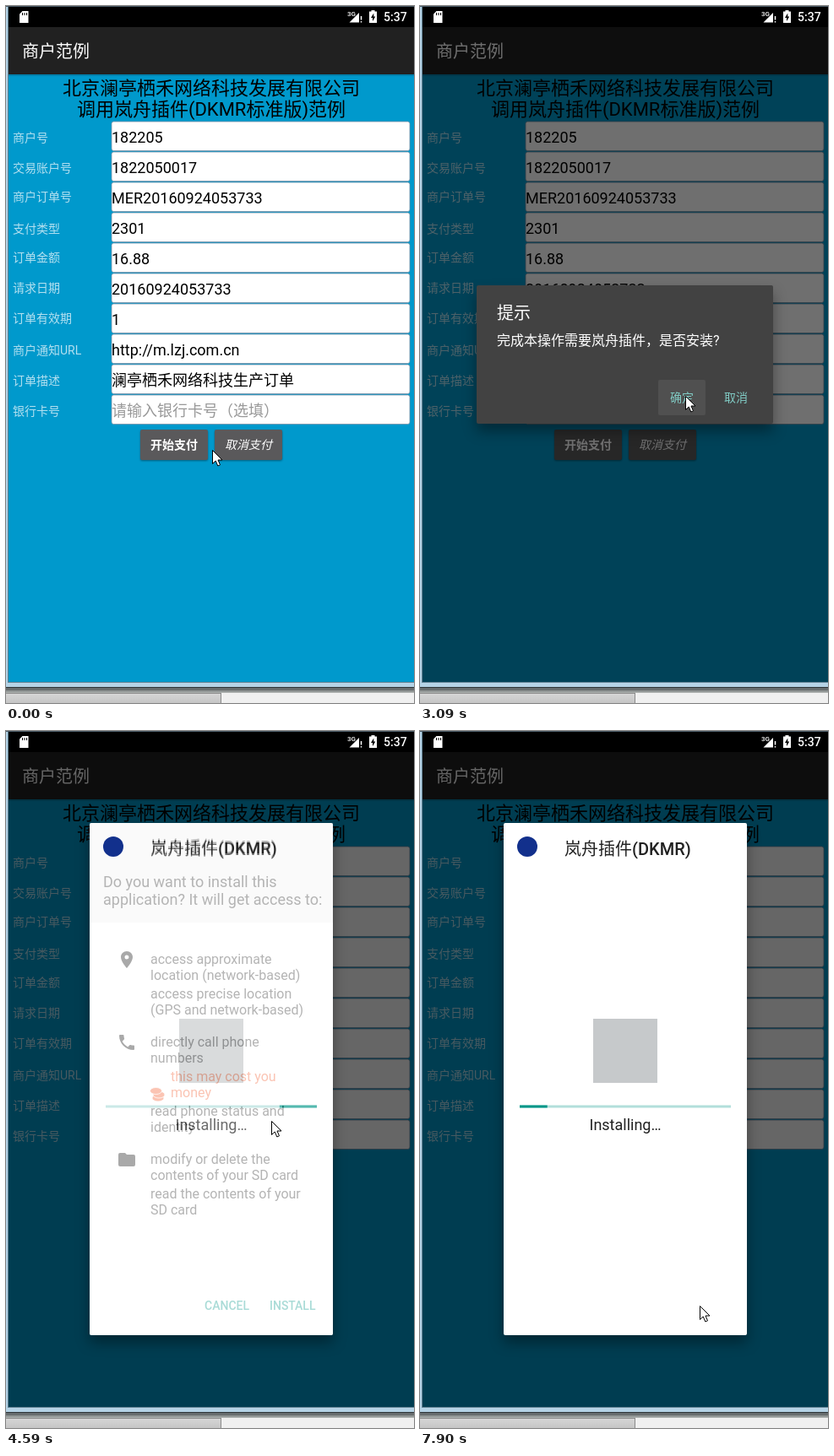
An HTML page for the animation above (8000 ms loop, 483 by 826 pixels).

```html
<!DOCTYPE html>
<html lang="zh">
<head>
<meta charset="utf-8">
<title>商户范例</title>
<style>
html, body { margin: 0; width: 100%; height: 100%; overflow: hidden; background: #f0f0f0; }
svg { display: block; width: 483px; height: 826px; font-family: Roboto, "Noto Sans CJK SC", "Noto Sans CJK", sans-serif; }
.mid { text-anchor: middle; }
.med { font-weight: 500; }
.bold { font-weight: 700; }
.lift { filter: drop-shadow(0 9px 8px rgba(0,0,0,.36)); }
.low { filter: drop-shadow(0 1px 1px rgba(0,0,0,.4)); }
</style>
</head>
<body>
<svg viewBox="0 0 483 826">
  <defs>
    <linearGradient id="edge" x2="0" y2="1">
      <stop offset="0" stop-color="#4c5254"/><stop offset="1" stop-color="#b4b8b6"/>
    </linearGradient>
    <linearGradient id="thumb" x2="0" y2="1">
      <stop offset="0" stop-color="#d6d6d6"/><stop offset="1" stop-color="#c2c2c2"/>
    </linearGradient>
  </defs>

  <!-- window frame -->
  <rect width="483" height="808" fill="#b5d3e6"/>
  <rect x="2" width="1" height="802" fill="#5f7f90"/>
  <rect y="801" x="2" width="481" height="1" fill="#5f7f90"/>
  <rect y="807" width="483" height="1.5" fill="#2b3336"/>
  <rect y="808.5" width="483" height="5.5" fill="url(#edge)"/>
  <rect x="-1" y="814.5" width="255.5" height="14" fill="url(#thumb)" stroke="#8a8a8a"/>

  <!-- status bar -->
  <rect x="3" width="480" height="25" fill="#000"/>
  <rect width="483" height="1" fill="#4a5a66"/>
  <path d="M19.5 6H26.5V20H16V9.5Z" fill="#fff"/>
  <path d="M19.5 8v3M22 8v3M24.5 8v3" stroke="#000"/>
  <text x="404" y="12" font-size="8" fill="#fff" class="med">3G</text>
  <path d="M418 8V19.5H406.5Z" fill="#fff"/>
  <path d="M420.5 12v4.5M420.5 18v1.5" stroke="#fff" stroke-width="1.5"/>
  <path d="M432.5 5h4v1.5h2.5V20h-9V6.5h2.5Z" fill="#fff"/>
  <path d="M435.3 8.5l-3.3 5.5h2v4l3.3-5.5h-2Z" fill="#000"/>
  <text x="447" y="18" font-size="14" fill="#fff" class="med">5:37</text>

  <!-- form -->
  <rect x="3" y="81" width="480" height="720" fill="#0099cc"/>
  <rect x="3" y="25" width="480" height="56" fill="#212121"/>
  <rect x="3" y="81" width="480" height="2" opacity=".15"/>
  <text x="19" y="60.5" font-size="20" fill="#fff">商户范例</text>
  <g font-size="22" class="mid">
    <text x="243" y="105">北京澜亭栖禾网络科技发展有限公司</text>
    <text x="243" y="130">调用岚舟插件(DKMR标准版)范例</text>
  </g>
  <g id="form"></g>
  <rect id="caret" x="125" y="141" width="2" height="28" fill="#80cbc4"/>
  <g font-size="14" class="mid">
    <rect x="159" y="502" width="80" height="36" rx="2" fill="#5a595b" class="low"/>
    <rect id="press" x="159" y="502" width="80" height="36" rx="2" fill="#fff"/>
    <rect x="247" y="502" width="80" height="36" rx="2" fill="#5a595b" class="low"/>
    <text x="199" y="525" fill="#fff" class="bold">开始支付</text>
    <text x="287" y="525" fill="#fff" font-style="italic">取消支付</text>
  </g>
  <rect id="dim" x="3" y="25" width="480" height="776"/>

  <!-- prompt -->
  <g id="prompt">
    <rect x="67" y="331" width="351" height="164" rx="2" fill="#424242" class="lift"/>
    <rect id="okPress" x="282" y="443" width="56" height="42" rx="2" fill="#505050"/>
    <text x="91" y="370.5" font-size="20" fill="#fff">提示</text>
    <text x="91" y="402" font-size="16" fill="#fff">完成本操作需要岚舟插件，是否安装?</text>
    <g font-size="14" fill="#80cbc4" class="med">
      <text x="296" y="469">确定</text>
      <text x="360" y="469">取消</text>
    </g>
  </g>

  <!-- installer -->
  <g id="installer" fill="#212121">
    <rect x="99" y="109" width="288" height="607" rx="2" fill="#fff" class="lift"/>
    <g id="progress">
      <text x="171" y="147" font-size="20" class="med">岚舟插件(DKMR)</text>
      <rect x="205" y="341" width="76" height="76" fill="#c6c9cb"/>
      <rect x="118" y="443.5" width="250" height="3" fill="#b2dfdb"/>
      <rect id="bar" y="443.5" height="3" fill="#009688"/>
      <text x="243" y="473" font-size="18" class="mid">Installing…</text>
    </g>
    <g id="perms">
      <rect x="99" y="109" width="288" height="607" rx="2" fill="#fff"/>
      <path d="M99 227V111q0-2 2-2H385q2 0 2 2V227Z" fill="#f3f3f3"/>
      <text x="171" y="145" font-size="20" class="med">岚舟插件(DKMR)</text>
      <g font-size="18">
        <text x="115" y="185">Do you want to install this</text>
        <text x="115" y="206">application? It will get access to:</text>
      </g>
      <g id="list" font-size="16"></g>
      <g fill="#000">
        <path transform="translate(131 259)" fill-rule="evenodd" d="M12 2C8.13 2 5 5.13 5 9c0 5.25 7 13 7 13s7-7.75 7-13c0-3.87-3.13-7-7-7zm0 9.5a2.5 2.5 0 1 1 0-5 2.5 2.5 0 0 1 0 5z"/>
        <path transform="translate(131 357)" d="M6.6 10.8c1.4 2.8 3.8 5.1 6.6 6.6l2.2-2.2c.3-.3.7-.4 1-.2 1.1.4 2.3.6 3.6.6q1 0 1 1V20q0 1-1 1C10.6 21 3 13.4 3 4q0-1 1-1h3.5q1 0 1 1c0 1.3.2 2.5.6 3.6q.1.5-.3 1z"/>
        <path transform="translate(131 496)" d="M10 4H4a2 2 0 0 0-2 2v12a2 2 0 0 0 2 2h16a2 2 0 0 0 2-2V8a2 2 0 0 0-2-2h-8z"/>
      </g>
      <g fill="#f4511e" stroke="#fff" stroke-width=".8">
        <rect x="173" y="431" width="14" height="8" rx="7" ry="4"/>
        <rect x="174" y="427" width="14" height="8" rx="7" ry="4"/>
        <rect x="170.5" y="422.5" width="14" height="8" rx="7" ry="4"/>
      </g>
      <rect id="goPress" x="304" y="663" width="71" height="36" rx="2" fill="#dcdcdc"/>
      <g font-size="14" fill="#009688" class="med">
        <text x="235" y="686">CANCEL</text>
        <text x="312" y="686">INSTALL</text>
      </g>
    </g>
    <circle cx="127" cy="137" r="12" fill="#12308c"/>
    <rect id="shade" x="99" y="109" width="288" height="607" rx="2" fill="#000"/>
  </g>

  <path id="mouse" d="M.5.5V16.5L4.2 13l2.6 6 2.7-1.2L7 12H12Z" fill="#fff" stroke="#000" stroke-linejoin="round"/>
</svg>
<script>
const $ = id => document.getElementById(id);
const fields = [
  ['商户号', '182205', 156], ['交易账户号', '1822050017', 192],
  ['商户订单号', 'MER20160924053733', 226], ['支付类型', '2301', 264],
  ['订单金额', '16.88', 298], ['请求日期', '20160924053733', 334],
  ['订单有效期', '1', 370], ['商户通知URL', 'http://m.lzj.com.cn', 408],
  ['订单描述', '澜亭栖禾网络科技生产订单', 444], ['银行卡号', '请输入银行卡号（选填）', 480]
];
$('form').innerHTML = fields.map(([label, value, mid], i) => {
  const y = 137 + 36 * i;
  return `<text x="8" y="${mid + 5}" font-size="14" fill="#b3e0f0">${label}</text>
    <rect x="125" y="${y}" width="353" height="34.5" rx="2.5" fill="#fff" stroke="#7f93a8" stroke-width=".8"/>
    <text x="125" y="${y + 24.5}" font-size="18" fill="${i == 9 ? '#999' : '#000'}">${value}</text>`;
}).join('');

const lines = [
  [276, 'access approximate'], [295, 'location (network-based)'],
  [317, 'access precise location'], [336, '(GPS and network-based)'],
  [374, 'directly call phone'], [393, 'numbers'],
  [415, 'this may cost you', 1], [434, 'money', 1],
  [456, 'read phone status and'], [475, 'identity'],
  [513, 'modify or delete the'], [532, 'contents of your SD card'],
  [554, 'read the contents of your'], [573, 'SD card']
];
$('list').innerHTML = lines.map(([y, s, warn]) =>
  `<text x="${warn ? 195 : 171}" y="${y}"${warn ? ' fill="#f4511e"' : ''}>${s}</text>`).join('');

// The screen only refreshes at these moments.
const ticks = [0, 150, 270, 410, 540, 680, 810, 1090, 1240, 1510, 1630, 1750, 1870, 1990,
  2410, 2540, 2670, 2800, 3090, 3510, 3640, 3770, 3900, 4020, 4150, 4440,
  4590, 4740, 4890, 5010, 5260, 5400, 5540, 5690, 5830, 5970, 6120, 6270,
  6540, 6690, 6810, 6970, 7120, 7260, 7400, 7540, 7660, 7780, 7900];

const fades = {
  dim: [[1630, 0], [1870, .34], [1990, .6], [3510, .55], [3640, .2], [3770, .04], [3900, .14], [4150, .48], [4440, .6]],
  prompt: [[1630, 0], [1870, .97], [1990, 1], [3400, 1], [3510, .7], [3640, 0]],
  installer: [[3640, 0], [3900, .7], [4020, 1]],
  perms: [[4440, 0], [4890, 1], [6540, 1], [6690, .5], [6810, 0]],
  shade: [[6540, 0], [6690, .3], [6810, .6], [6970, .45], [7260, 0]]
};
const path = [[30, 244, 526], [810, 195, 515], [1080, 195, 515], [1090, 194, 514], [2280, 194, 514],
  [2800, 314, 462], [5130, 314, 462], [5540, 263, 637], [6270, 331, 681]];

function at(keys, t, n = 1) {
  const i = keys.findIndex(k => k[0] > t);
  if (i == 0) return keys[0][n];
  if (i < 0) return keys[keys.length - 1][n];
  const a = keys[i - 1], b = keys[i];
  return a[n] + (b[n] - a[n]) * (t - a[0]) / (b[0] - a[0]);
}
const within = (t, a, b) => t >= a && t < b;
const ramp = v => Math.min(1, Math.max(0, v)) ** 1.5;
const show = (id, v) => $(id).setAttribute('opacity', +v);

function draw(now) {
  const t = ticks.filter(k => k <= now).pop();
  for (const id in fades) show(id, at(fades[id], t));
  show('caret', within(t, 270, 810) || within(t, 1240, 1510));
  show('press', within(t, 1510, 2410) ? .1 : 0);
  show('okPress', t >= 3090);
  show('goPress', within(t, 6540, 6810));

  const u = (t + 776 * 10 - 7760) % 776 / 776;
  const head = ramp(u / .7), tail = ramp((u - .3) / .7);
  $('bar').setAttribute('x', 118 + 250 * tail);
  $('bar').setAttribute('width', 250 * (head - tail));

  $('mouse').setAttribute('transform', `translate(${at(path, t, 1)} ${at(path, t, 2)})`);
}

const start = performance.now();
function loop() {
  draw(Math.max(0, performance.now() - start) % 8000);
  requestAnimationFrame(loop);
}
loop();
</script>
</body>
</html>
```
